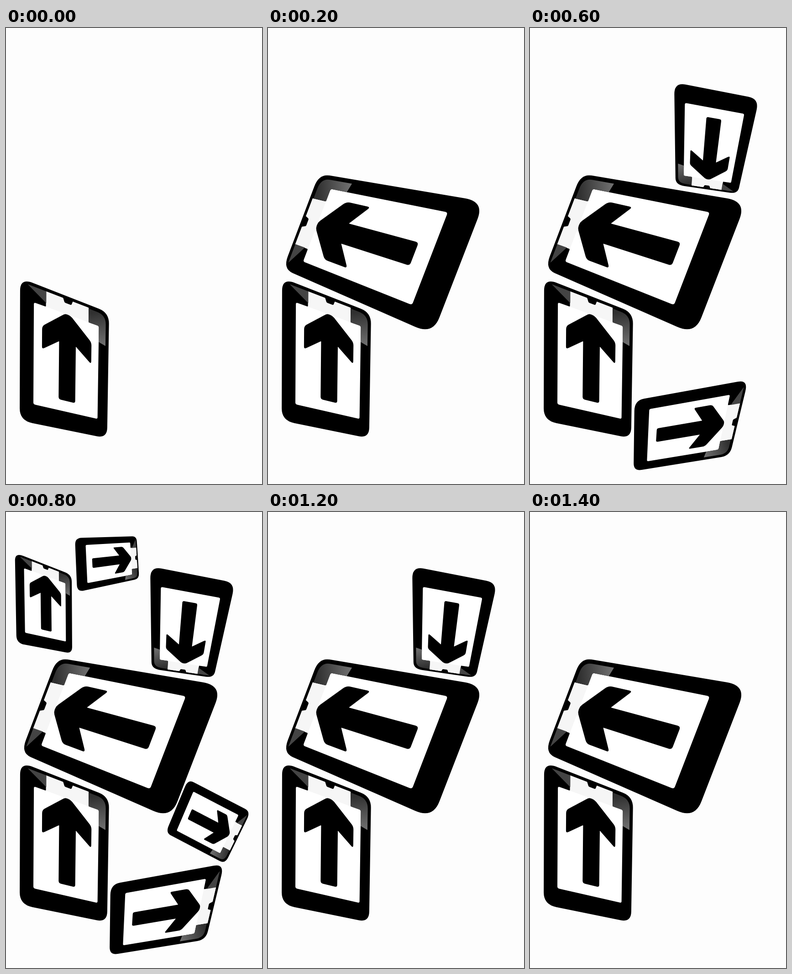
Recreate the animation shown at these times as an HTML page with a canvas. Size 561 by 998 pixels, loop 1.6 s.

```html
<!DOCTYPE html>
<html lang="en">
<head>
<meta charset="utf-8">
<style>
  html, body { margin: 0; width: 100%; height: 100%; overflow: hidden; background: #fdfdfd; }
  canvas { display: block; width: 100vw; height: 100vh; }
</style>
</head>
<body>
<canvas id="stage" width="561" height="998"></canvas>
<script>
const ctx = document.getElementById('stage').getContext('2d');
const W = 200, H = 300, MID = 101.5, STEP = 200;

// One flat sign is hung in perspective: where its TL, TR, BR and BL corners land
const quads = [
  [[31, 547], [226, 623], [221.5, 898], [30, 859]],
  [[33, 527], [112, 319], [474, 380], [361, 671]],
  [[455, 363], [319, 343], [316, 119], [502, 155]],
  [[478, 770], [438, 936], [227, 970], [229, 815]],
  [[19.5, 89], [144, 137.5], [145, 310], [23, 287]],
  [[286, 53], [292, 146], [156, 175], [151, 57]],
  [[536, 656], [480, 770], [350, 702], [399, 585]]
];
const counts = [1, 2, 3, 4, 7, 4, 3, 2]; // signs visible in each step

// Completes a shape from its right half; points are [offset, y, corner radius]
const mirror = half => [
  ...half.map(([x, y, r]) => [MID + x, y, r]),
  ...half.map(([x, y, r]) => [MID - x, y, r]).reverse()
];

const plate = [[0, 0, 26], [W, 0, 26], [W, H, 26], [0, H, 26]];
const panel = mirror([[48, 7, 0], [48, 40, 2], [73.5, 40, 4], [73.5, 258.5, 4]]);
const tab = mirror([[48, 7, 0], [48, 40, 0]]);
const notch = mirror([[12, 4, 0], [7.5, 16, 2]]);
const arrow = mirror([[6, 40, 5], [56, 84, 7], [56, 134, 6], [19, 105, 1], [19, 234, 5]]);
const smallGlare = [[15, 7, 2], [54, 7, 0], [54, 32, 0]];
const bigGlare = [[150, 9, 0], [192, 9, 22], [192, 81, 0], [175, 77, 0], [175, 40, 4], [150, 40, 0]];

// Perspective map from the flat sign to a quad
function perspective([[x0, y0], [x1, y1], [x2, y2], [x3, y3]]) {
  const sx = x0 - x1 + x2 - x3, sy = y0 - y1 + y2 - y3;
  const ax = x1 - x2, ay = y1 - y2, bx = x3 - x2, by = y3 - y2;
  const den = ax * by - bx * ay;
  const g = (sx * by - bx * sy) / den, h = (ax * sy - sx * ay) / den;
  return ([x, y]) => {
    const u = x / W, v = y / H, w = 1 + g * u + h * v;
    return [
      (x0 + (x1 - x0 + g * x1) * u + (x3 - x0 + h * x3) * v) / w,
      (y0 + (y1 - y0 + g * y1) * u + (y3 - y0 + h * y3) * v) / w
    ];
  };
}

function toward(a, b, d) {
  const t = d / Math.hypot(b[0] - a[0], b[1] - a[1]);
  return [a[0] + (b[0] - a[0]) * t, a[1] + (b[1] - a[1]) * t];
}

function fill(map, pts, color) {
  ctx.beginPath();
  pts.forEach((p, i) => {
    const prev = pts.at(i - 1), next = pts[(i + 1) % pts.length];
    ctx.lineTo(...map(toward(p, prev, p[2])));
    ctx.quadraticCurveTo(...map(p), ...map(toward(p, next, p[2])));
  });
  ctx.closePath();
  ctx.fillStyle = color;
  ctx.fill();
}

function drawSign(map) {
  const glare = ctx.createLinearGradient(...map([170, 9]), ...map([186, 81]));
  glare.addColorStop(0, '#303030');
  glare.addColorStop(1, '#707070');
  fill(map, plate, '#000');
  fill(map, panel, '#fff');
  fill(map, tab, '#f6f6f6');
  fill(map, notch, '#000');
  fill(map, smallGlare, '#444');
  fill(map, bigGlare, glare);
  fill(map, arrow, '#000');
}

const signs = quads.map(perspective);

function frame(now) {
  const shown = counts[Math.floor(now / STEP) % counts.length];
  ctx.fillStyle = '#fdfdfd';
  ctx.fillRect(0, 0, 561, 998);
  signs.slice(0, shown).forEach(drawSign);
  requestAnimationFrame(frame);
}
requestAnimationFrame(frame);
</script>
</body>
</html>
```
